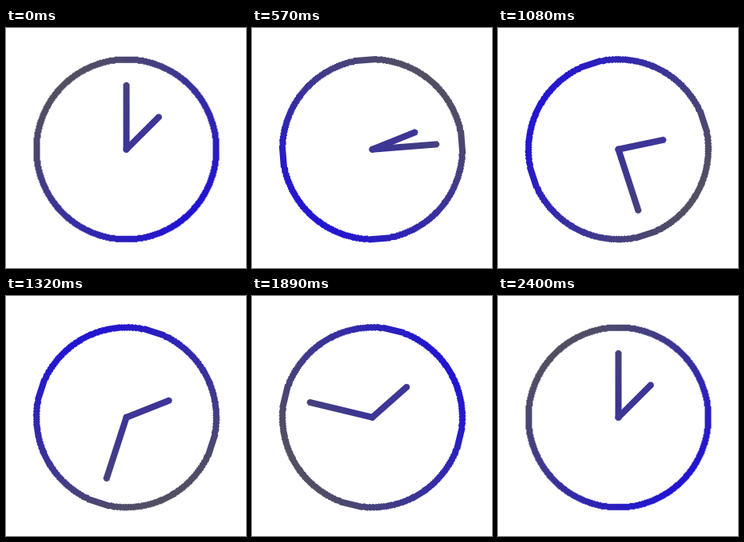
Animation, 300 px wide and 300 px high, one loop 2.49 s. Source, as an HTML page:

```html
<!DOCTYPE html>
<html lang="en">
<head>
<meta charset="utf-8">
<title>Clock</title>
<style>
  html, body { margin: 0; width: 100%; height: 100%; overflow: hidden; background: #fff; }
  svg { display: block; width: 100%; height: 100%; }
  .dial, .hour { transform-origin: 0 0; }
  .dial { animation: turn 2400ms linear both paused; }
  .hour { animation: sway 2400ms both paused; }
  @keyframes turn {
    to { transform: rotate(360deg); }
  }
  @keyframes sway {
    0% { transform: rotate(45deg); animation-timing-function: cubic-bezier(.38, 0, .6, 1); }
    40% { transform: rotate(80deg); animation-timing-function: cubic-bezier(.3, .1, .3, 1); }
    100% { transform: rotate(45deg); }
  }
</style>
</head>
<body>
<svg viewBox="0 0 300 300">
  <defs>
    <linearGradient id="ink" gradientUnits="userSpaceOnUse" x1="-82" y1="-82" x2="82" y2="82">
      <stop offset="0" stop-color="rgb(82,80,96)"/>
      <stop offset="1" stop-color="rgb(33,20,210)"/>
    </linearGradient>
  </defs>
  <g transform="translate(150.5 151.7)" fill="none" stroke-width="8" stroke-linecap="round" shape-rendering="crispEdges">
    <g class="dial" stroke="url(#ink)">
      <circle r="112.5"/>
      <path d="M0 0V-80"/>
    </g>
    <path class="hour" d="M0 0V-57" stroke="rgb(61,54,150)"/>
  </g>
</svg>
<script>
  const LOOP = 2490, TURN = 2400, STEP = 30;
  const parts = document.getAnimations();
  const start = performance.now();

  // The hands tick in 30 ms steps and rest briefly at the end of each turn.
  function draw() {
    const t = (performance.now() - start) % LOOP;
    const time = Math.min(TURN, Math.floor(t / STEP) * STEP);
    for (const part of parts) part.currentTime = time;
    requestAnimationFrame(draw);
  }
  draw();
</script>
</body>
</html>
```
